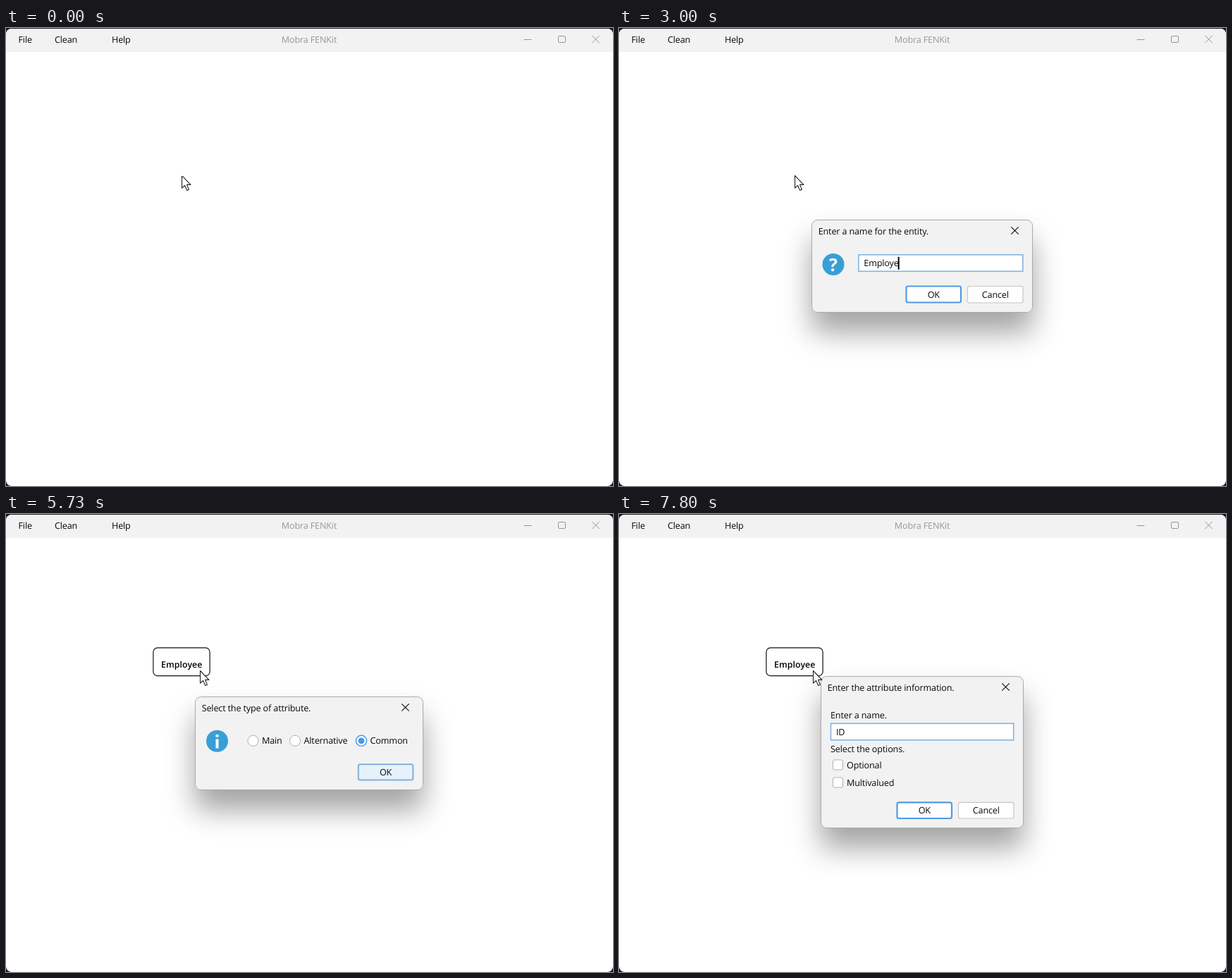
Write an HTML page that moves like this. It is 861 px wide and 650 px high and loops after 8 s.

```html
<!DOCTYPE html>
<html lang="en">
<head>
<meta charset="utf-8">
<title>Diagram editor</title>
<style>
html, body { margin: 0; width: 100%; height: 100%; overflow: hidden; background: #1c1c1c; }
svg { display: block; }
text { font: 12.6px "Open Sans", "Noto Sans", sans-serif; letter-spacing: -.15px; fill: #0a0a0a;
  text-rendering: geometricPrecision; white-space: pre; }
.mid { text-anchor: middle; }
.line { fill: none; stroke: #111; stroke-width: 1.2; }
.panel { fill: #f2f2f2; stroke: #a9a9a9; filter: url(#shadow); }
.field { fill: #fff; stroke: #86b3dc; stroke-width: 1.6; }
.btn { fill: #fff; stroke: #c6c6c6; stroke-width: 1.2; }
.btn.default { stroke: #4f9ae3; stroke-width: 2.2; }
.btn.focus { fill: #e6f2fb; stroke: #7fb1dc; stroke-width: 2; }
.box { fill: #fff; stroke: #b0b0b0; }
.box.on { stroke: #4a98e6; stroke-width: 1.4; }
.blue { fill: #389fd6; }
.mark { fill: #fff; font-size: 25px; font-weight: 700; }
.label { font-size: 12.3px; font-weight: 600; letter-spacing: .1px; fill: #000; }
#title { fill: #666; }
.inactive #title { fill: #979797; }
.inactive #controls { stroke: #959595; stroke-width: 1; }
</style>
</head>
<body>
<svg id="stage" width="861" height="650" viewBox="0 0 861 650"></svg>
<script>
const stage = document.getElementById('stage');

const text = (x, y, s, cls = '') => `<text x="${x}" y="${y}" class="${cls}">${s}</text>`;
const rect = (x, y, w, h, cls = '', r = 0) =>
  `<rect x="${x}" y="${y}" width="${w}" height="${h}" rx="${r}" class="${cls}"/>`;
const circle = (x, y, r, cls) => `<circle cx="${x}" cy="${y}" r="${r}" class="${cls}"/>`;
const cross = (x, y) => `M${x - 5.2} ${y - 5.2}l10.4 10.4m0-10.4l-10.4 10.4`;
const button = (x, y, w, h, s, cls = '') =>
  rect(x, y, w, h, 'btn ' + cls, 2.5) + text(x + w / 2, y + h / 2 + 4.7, s, 'mid');
const field = (x, y, w, h) => rect(x, y, w, h, 'field') +
  text(x + 7.5, y + 16.5, '', 'typed') + rect(x + 6.5, y + 3, 2, 18, 'caret');
const radio = (x, s, on) => circle(x, 321.8, 7.6, on ? 'box on' : 'box') +
  (on ? `<circle cx="${x}" cy="321.8" r="4.4" fill="#4a98e6"/>` : '') + text(x + 12.5, 326.3, s);
const check = (y, s) => rect(303.5, y, 14, 14, 'box', 2) + text(323, y + 12, s);
const dialog = (id, x, y, w, h, title, body) => `<g id="${id}">` +
  rect(x, y, w, h, 'panel', 8) + text(x + 9.2, y + 20.4, title) +
  `<path class="line" d="${cross(x + w - 25, y + 15)}"/>${body}</g>`;

const items = ['Add attribute', 'Rename', 'Convert to weak entity', 'Delete'];

stage.innerHTML = `
<defs>
  <filter id="shadow" x="-30%" y="-50%" width="160%" height="220%">
    <feDropShadow dx="0" dy="28" stdDeviation="20" flood-opacity=".36"/>
  </filter>
  <clipPath id="frame"><rect y="1" width="861" height="649" rx="8"/></clipPath>
</defs>
<rect width="861" height="650" fill="#1c1c1c"/>
<g clip-path="url(#frame)">
  <rect width="861" height="650" fill="#fff"/>
  <rect width="861" height="34" fill="#f2f2f2"/>
</g>
${text(17.5, 21, 'File')}${text(69, 21, 'Clean')}${text(150, 21, 'Help')}
<text id="title" class="mid" x="430" y="21">Mobra FENKit</text>
<path id="controls" class="line" d="M734.5 16.5h11M785 11.5h7q1.5 0 1.5 1.5v6q0 1.5-1.5 1.5h-7q-1.5 0-1.5-1.5v-6q0-1.5 1.5-1.5z${cross(836.5, 16)}"/>
<g id="entity">${rect(208.9, 189.9, 80.2, 39.8, 'line', 6)}${text(249.2, 218, 'Employee', 'mid label')}</g>
<g id="menu">
  <rect x="249.5" y="210.5" width="202" height="112" fill="#fff" stroke="#b5b5b5"/>
  <rect id="hover" x="250" y="214" width="201" height="26" fill="#2675bf"/>
  ${items.map((s, i) => text(275, 231.5 + 26 * i, s)).join('')}
</g>
${dialog('naming', 273.5, 272.5, 313, 131, 'Enter a name for the entity.',
  circle(304, 335.5, 15.5, 'blue') + text(304, 344.5, '?', 'mid mark') +
  field(339.8, 321.8, 233, 23.5) +
  button(407.5, 366.5, 77.5, 23, 'OK', 'default') + button(494.5, 366.5, 78.5, 23.5, 'Cancel'))}
${dialog('kind', 268.5, 259.5, 323, 132, 'Select the type of attribute.',
  circle(299.5, 322.3, 15.5, 'blue') +
  '<path d="M299.5 319.5v13M299.5 313v3.6" stroke="#fff" stroke-width="4"/>' +
  radio(350.5, 'Main') + radio(410, 'Alternative') + radio(504, 'Common', true) +
  button(499.8, 355.3, 77.5, 22.2, 'OK', 'focus'))}
${dialog('details', 286.5, 230.5, 287, 215, 'Enter the attribute information.',
  text(300, 289.6, 'Enter a name.') + field(300.5, 297.3, 259.2, 23.5) +
  text(300, 337.8, 'Select the options.') +
  check(349, 'Optional') + check(374, 'Multivalued') +
  button(394.5, 409.3, 77.5, 22.7, 'OK', 'default') + button(481.5, 409.3, 78.5, 22.7, 'Cancel'))}
<path id="cursor" d="M.5.5V18.2L4.6 14.5 7.6 21.4 10.4 20.2 7.5 13.4H12.9Z" fill="#fff" stroke="#222" stroke-width="1.1" stroke-linejoin="round"/>
<rect id="cover" x="246" y="207" width="8" height="3" fill="#fff"/>`;

// All times below are ticks of 1/15 s.
const dialogs = [
  { id: 'naming', open: 14, close: 52, word: 'Employee', keys: [19, 21, 25, 36, 39, 42, 45, 48], off: [[33, 36]] },
  { id: 'kind', open: 82, close: 91 },
  { id: 'details', open: 94, close: 999, word: 'ID', keys: [107, 110], off: [[103, 107], [117, 120]] }
];
for (const d of dialogs) {
  d.el = document.getElementById(d.id);
  const p = d.el.querySelector('.panel').getBBox();
  d.cx = p.x + p.width / 2;
  d.cy = p.y + p.height / 2;
  d.typed = d.el.querySelector('.typed');
  d.caret = d.el.querySelector('.caret');
}
const [entity, menu, hover, cursor, cover] =
  ['entity', 'menu', 'hover', 'cursor', 'cover'].map(id => document.getElementById(id));
const firstItem = menu.querySelector('text');
const within = (n, a, b) => n >= a && n < b;
const show = (el, on) => el.style.visibility = on ? 'visible' : 'hidden';

function drawDialog(d, n) {
  const age = n - d.open, gone = n - d.close;
  const alpha = age < 0 ? 0 : gone < 0 ? Math.min(1, .3 + .4 * age) : Math.max(0, .8 - .27 * gone);
  d.el.style.display = alpha ? '' : 'none';
  if (!alpha) return;
  const s = gone < 0 ? (age > 3 ? 1 : 1 - .09 * .39 ** age) : 1 - .025 * (gone + 1);
  d.el.setAttribute('opacity', alpha);
  d.el.setAttribute('transform', `translate(${d.cx} ${d.cy}) scale(${s}) translate(${-d.cx} ${-d.cy})`);
  if (!d.word) return;
  d.typed.textContent = d.word.slice(0, d.keys.filter(k => k <= n).length);
  d.caret.setAttribute('transform', `translate(${d.typed.textContent ? d.typed.getComputedTextLength() : 0} 0)`);
  d.caret.style.display = d.off.some(([a, b]) => within(n, a, b)) ? 'none' : '';
}

function draw(n) {
  stage.classList.toggle('inactive', n < 7 || within(n, 14, 53) || n >= 82);
  show(entity, n >= 54);
  const open = within(n, 63, 80), lit = open && n >= 71;
  show(menu, open);
  show(hover, lit);
  firstItem.style.fill = lit ? '#fff' : '';
  show(cover, n < 7);
  const move = [0, .35, .75, 1][Math.max(0, Math.min(3, n - 70))];
  cursor.setAttribute('transform', `translate(${249 + Math.round(26 * move)} ${209 + Math.round(13 * move)})`);
  dialogs.forEach(d => drawDialog(d, n));
}

let last = -1;
function tick() {
  const n = Math.floor(performance.now() % 8000 * .015 + .06) % 120;
  if (n !== last) draw(last = n);
  requestAnimationFrame(tick);
}
tick();
</script>
</body>
</html>
```
